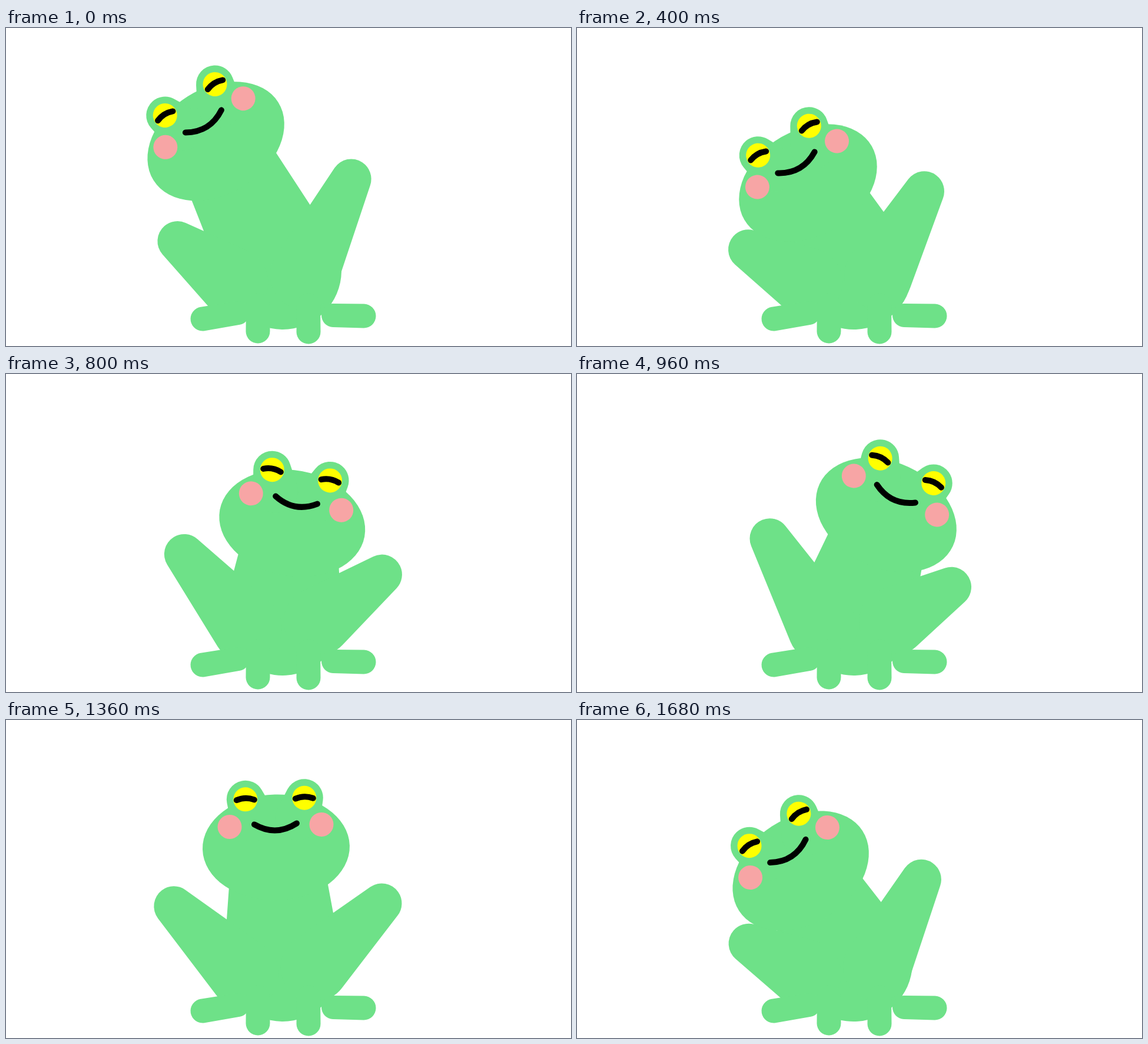
Write an HTML page with a canvas that moves like this. It is 960 px wide and 540 px high and loops after 1.76 s.

```html
<!DOCTYPE html>
<html lang="en">
<head>
<meta charset="utf-8">
<title>Dancing frog</title>
<style>
  html, body { margin: 0; width: 100%; height: 100%; overflow: hidden; background: #fff; }
  canvas { display: block; }
</style>
</head>
<body>
<canvas id="stage" width="960" height="540"></canvas>
<script>
const ctx = document.getElementById('stage').getContext('2d');
const LOOP = 1760, STEP = 80, BEAT = 440, BOUNCE = 32;
const GREEN = '#6ee188', PINK = '#f7a5a5', YELLOW = '#ff0';

// Key poses of the face; the rest of the body follows it.
// time, x, y, tilt in degrees
const poses = [
  [0, 337, 161, -32],
  [400, 374, 231, -30],
  [640, 445, 272, -4],
  [960, 541, 206, 25],
  [1200, 520, 215, 21],
  [1520, 396, 233, -24],
  [1680, 360, 225, -33],
  [LOOP, 337, 161, -32]
];

const mix = (a, b, f) => a + (b - a) * f;
const beat = t => Math.cos(2 * Math.PI * t / BEAT);

function dot(x, y, r, color) {
  ctx.fillStyle = color;
  ctx.beginPath();
  ctx.arc(x, y, r, 0, 2 * Math.PI);
  ctx.fill();
}

// Tapered shape around two circles.
function limb(x1, y1, r1, x2, y2, r2) {
  const a = Math.atan2(y2 - y1, x2 - x1);
  const b = Math.acos((r1 - r2) / Math.hypot(x2 - x1, y2 - y1));
  ctx.fillStyle = GREEN;
  ctx.beginPath();
  ctx.arc(x1, y1, r1, a + b, a - b + 2 * Math.PI);
  ctx.arc(x2, y2, r2, a - b, a + b);
  ctx.fill();
}

// Horizontal stroke around x, y, bent down by `sag`.
function curve(x, y, half, sag) {
  ctx.strokeStyle = '#000';
  ctx.lineWidth = 10;
  ctx.beginPath();
  ctx.moveTo(x - half, y);
  ctx.quadraticCurveTo(x, y + sag, x + half, y);
  ctx.stroke();
}

// Position of the face at time t: key poses plus a bounce on every beat.
function faceAt(t) {
  const i = poses.findLastIndex(p => p[0] <= t);
  const [from, to] = [poses[i], poses[i + 1]];
  const f = (t - from[0]) / (to[0] - from[0]);
  const [, x, y, tilt] = from.map((v, j) => mix(v, to[j], f));
  const lift = beat(t) - mix(beat(from[0]), beat(to[0]), f);
  return { x, y: y - BOUNCE * lift, tilt };
}

function drawBody({ x, y, tilt }) {
  const angle = tilt * Math.PI / 180;
  const headX = x - 37 * Math.sin(angle), headY = y + 37 * Math.cos(angle);
  limb(headX, headY, 75, 470, 412, 100);

  // Knees tip against the head and draw together as it leans.
  const kneeX = 463 + 0.75 * tilt, kneeY = 324 + 0.25 * (y - 220);
  const spread = 178 - 0.95 * Math.abs(tilt), tip = 1.65 * tilt;
  const shift = 0.15 * (x - 440);
  limb(kneeX - spread, kneeY - tip, 34, 402 + shift, 432, 59);
  limb(kneeX + spread, kneeY + tip, 34, 522 + shift, 420, 58);

  limb(334, 494, 20.5, 394, 484, 20);
  limb(608, 489, 20.5, 556, 488, 20);
  limb(428, 515, 20.5, 428, 470, 20);
  limb(514, 516, 20.5, 514, 470, 20);
}

function drawHead({ x, y, tilt }) {
  ctx.save();
  ctx.translate(x, y);
  ctx.rotate(tilt * Math.PI / 180);

  ctx.fillStyle = GREEN;
  ctx.beginPath();
  ctx.ellipse(0, 37, 125, 90, 0, 0, 2 * Math.PI);
  ctx.fill();
  for (const side of [-1, 1]) {
    limb(side * 50, -46, 32, side * 38, -12, 38);
    dot(side * 50, -46, 20.5, YELLOW);
    curve(side * 50, -45, 15, -6);
    dot(side * 78, 0, 20.5, PINK);
  }
  curve(0, -3, 36, 22);
  ctx.restore();
}

function draw(t) {
  ctx.fillStyle = '#fff';
  ctx.fillRect(0, 0, 960, 540);
  ctx.lineCap = 'round';
  const face = faceAt(t);
  drawBody(face);
  drawHead(face);
}

const start = performance.now();
function tick() {
  const t = (performance.now() - start) % LOOP;
  draw(Math.floor(t / STEP) * STEP);
  requestAnimationFrame(tick);
}
tick();
</script>
</body>
</html>
```
